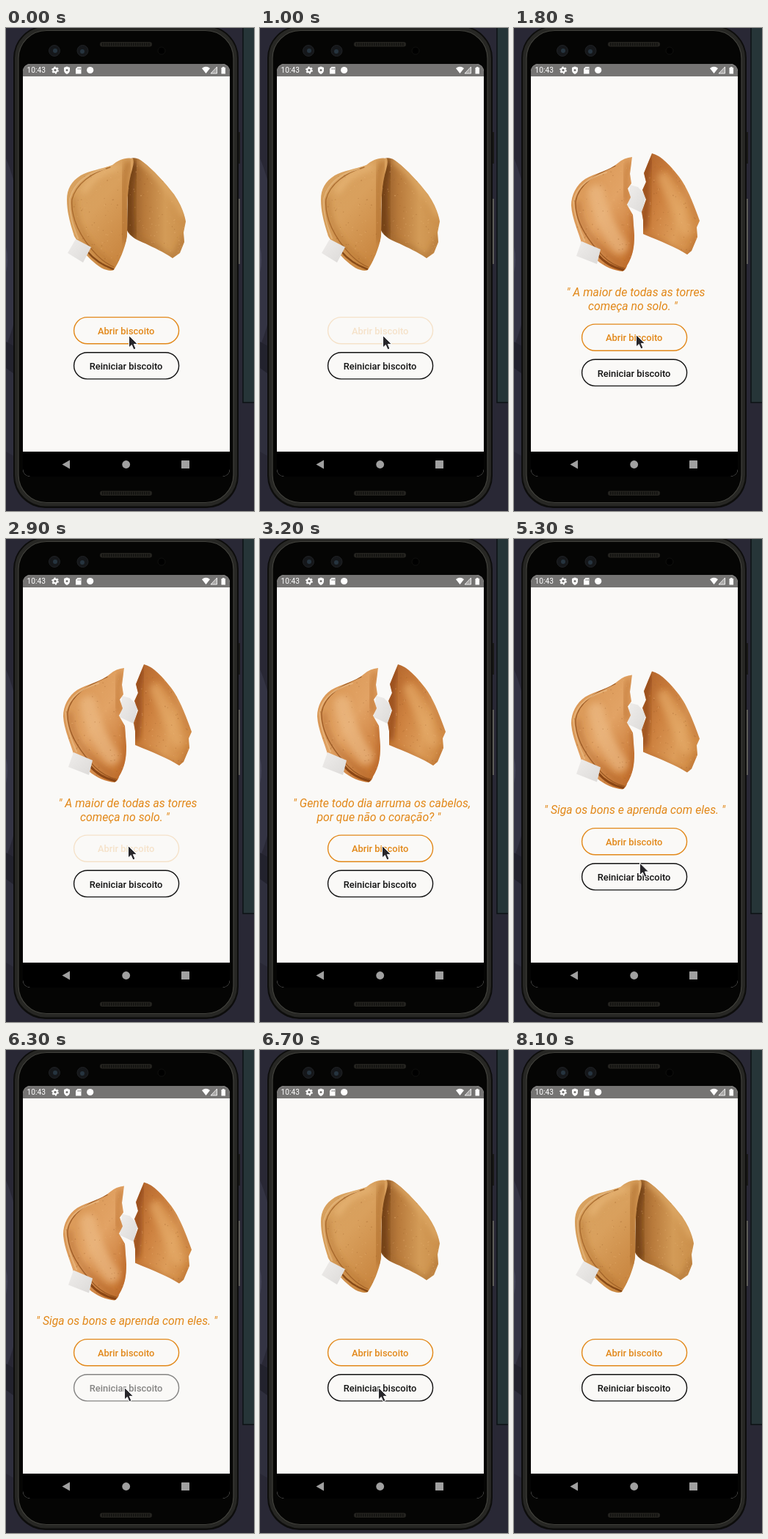
An HTML page that plays this animation: 338 by 659 pixels, repeating every 8.2 s.

```html
<!DOCTYPE html>
<html lang="pt">
<head>
<meta charset="utf-8">
<title>Biscoito da sorte</title>
<style>
  html, body { margin: 0; width: 100%; height: 100%; overflow: hidden; background: #292835; }
  svg { display: block; width: 338px; height: 659px; }
  text { font-family: Roboto, Arial, sans-serif; }
  .quote { font-size: 15.8px; font-style: italic; fill: #e28819; text-anchor: middle; }
  .button rect { fill: none; stroke-width: 1.4; }
  .button text { font-size: 12.9px; font-weight: 500; text-anchor: middle; }
  .soft { fill: none; filter: url(#blur); stroke-linecap: round; }
  .line { fill: none; stroke-linecap: round; }
</style>
</head>
<body>
<svg viewBox="0 0 338 659">
  <defs>
    <filter id="blur" x="-50%" y="-50%" width="200%" height="200%"><feGaussianBlur stdDeviation="4"/></filter>
    <linearGradient id="lobe" x1="0" y1="0" x2=".7" y2="1">
      <stop offset="0" stop-color="#d7a260"/><stop offset=".5" stop-color="#d9a05d"/><stop offset="1" stop-color="#c8853f"/>
    </linearGradient>
    <linearGradient id="inner">
      <stop offset="0" stop-color="#8d5524"/><stop offset=".3" stop-color="#b87a3b"/>
      <stop offset=".65" stop-color="#d39b57"/><stop offset="1" stop-color="#cb8f4a"/>
    </linearGradient>
    <linearGradient id="halfLeft" x1="0" y1="0" x2=".8" y2="1">
      <stop offset="0" stop-color="#d69350"/><stop offset=".55" stop-color="#e2a365"/><stop offset="1" stop-color="#c67431"/>
    </linearGradient>
    <linearGradient id="halfRight" x1="0" y1=".2" x2="1" y2=".7">
      <stop offset="0" stop-color="#b0622a"/><stop offset=".35" stop-color="#cd813f"/>
      <stop offset=".7" stop-color="#dd9d5a"/><stop offset="1" stop-color="#d08a45"/>
    </linearGradient>
    <linearGradient id="paper" x1="0" y1="0" x2="1" y2="1">
      <stop offset="0" stop-color="#efedeb"/><stop offset="1" stop-color="#dcdad8"/>
    </linearGradient>
    <path id="closedRight" d="M167 180C172 175 181 177 187 183C200 193 216 210 229 227C238 240 243 253 245 264L242 279 243 292 237 307 227 314C214 305 202 300 190 294C180 290 169 285 165 276Z"/>
    <path id="closedLeft" d="M173 178C163 176 153 180 145 187C132 192 112 195 102 201C89 209 83 220 83 234C83 252 88 268 93 284L108 308C117 318 128 328 137 330Q143 332 147 330C154 319 162 302 165 284C166 257 163 221 172 193Q175 183 173 178Z"/>
    <path id="openLeft" d="M161 176Q150 177 142 184C130 195 110 198 97 206C85 214 78 228 78 242C79 260 87 276 92 293L112 316C123 326 137 331 148 332Q153 329 154 324C162 311 164 299 164 283L162 255 154 241 159 231 155 219 160 212 158 199Z"/>
    <path id="openRight" d="M188 171C201 174 214 189 225 203C237 219 245 241 253 263L249 272 250 285 242 304 236 309C221 299 202 292 176 281L176 262 174 251 180 234 175 221 180 210 177 198Z"/>
    <clipPath id="clip-closedRight"><use href="#closedRight"/></clipPath>
    <clipPath id="clip-closedLeft"><use href="#closedLeft"/></clipPath>
    <clipPath id="clip-openLeft"><use href="#openLeft"/></clipPath>
    <clipPath id="clip-openRight"><use href="#openRight"/></clipPath>
    <clipPath id="screen"><rect x="23" y="49" width="282" height="563" rx="10"/></clipPath>
  </defs>

  <!-- Desktop -->
  <rect width="338" height="659" fill="#292835"/>
  <ellipse cx="-38" cy="306" rx="60" ry="165" fill="#343444"/>
  <ellipse cx="-38" cy="316" rx="40" ry="56" fill="#434356"/>
  <path d="M0 428L14 436V474L0 464Z" fill="#22222d"/>
  <path d="M0 464L14 474V586L0 578Z" fill="#2f2f3d"/>
  <rect x="323" y="-2" width="18" height="513" fill="#263538" stroke="#0d1214" stroke-width="1.5"/>

  <!-- Phone -->
  <path d="M317.5 142V185" stroke="#191917" stroke-width="3"/>
  <path d="M317.5 233V322" stroke="#65645f" stroke-width="2.5"/>
  <rect x="10" y="-3" width="307" height="658" rx="44" fill="#0d0d0c"/>
  <rect x="14.500" y="1" width="298" height="649" rx="40" fill="none" stroke="#272724" stroke-width="5"/>
  <rect x="17" y="3.500" width="293" height="644" rx="38" fill="#050504" stroke="#42423d" stroke-width="1.2"/>
  <g fill="#15171a" stroke="#202225">
    <circle cx="66" cy="31" r="7.5"/><circle cx="104.500" cy="31" r="7.5"/>
  </g>
  <g fill="#26343f"><circle cx="67" cy="31" r="3"/><circle cx="104" cy="32" r="3"/></g>
  <circle cx="212" cy="31" r="5" fill="#000" stroke="#11110f"/>
  <g id="grille">
    <rect x="128" y="19" width="71" height="6.500" rx="3.2" fill="#24231f"/>
    <path d="M131 22.200H197" stroke="#11110f" stroke-width="4" stroke-dasharray="1.5 1.5"/>
  </g>
  <use href="#grille" y="612.500"/>

  <!-- Screen -->
  <g clip-path="url(#screen)">
    <rect x="23" y="49" width="282" height="563" fill="#faf9f7"/>
    <rect x="23" y="49" width="282" height="17" fill="#757473"/>
    <rect x="23" y="578" width="282" height="34"/>
  </g>
  <g fill="#fff">
    <text x="28.500" y="61.300" font-size="10.2">10:43</text>
    <circle cx="67" cy="57.500" r="2.7" fill="none" stroke="#fff" stroke-width="2"/>
    <circle cx="67" cy="57.500" r="4.2" fill="none" stroke="#fff" stroke-width="1.5" stroke-dasharray="2.2 2.2"/>
    <path d="M83 52.500L87 54V57.500Q87 61 83 63Q79 61 79 57.500V54Z"/>
    <circle cx="83" cy="57.500" r="1.5" fill="#757473"/>
    <path d="M97.500 53H102.500V62.500H95V55.500Z"/>
    <path d="M98 54.500V57M99.800 54.500V57M101.300 54.500V57" stroke="#757473" stroke-width=".7"/>
    <circle cx="114.700" cy="57.500" r="4.6"/>
    <path d="M267 55Q272.500 50.500 278 55L272.500 62Z"/>
    <path d="M287.500 53V62H279Z" fill="#aaa9a8" stroke="#fff" stroke-width=".8"/>
    <path d="M293.500 54H295V53H297.500V54H299V62.500H293.500Z"/>
  </g>
  <g fill="#a0a0a0">
    <path d="M76.500 595.500L87 589.500V601.500Z"/><circle cx="163.700" cy="595.500" r="5.4"/><rect x="239" y="590" width="11" height="11" rx=".5"/>
  </g>

  <!-- Whole cookie -->
  <g id="whole">
    <use href="#closedRight" fill="url(#inner)"/>
    <g clip-path="url(#clip-closedRight)">
      <path class="soft" d="M174 188C165 216 167 250 170 285" stroke="#67380f" stroke-width="13" opacity=".75"/>
      <path class="soft" d="M184 181C205 198 228 225 242 254" stroke="#dfaa68" stroke-width="7"/>
      <path class="soft" d="M176 287Q203 297 228 315L244 285" stroke="#a56a2d" stroke-width="4"/>
      <g data-speckle="165 180 80 130"></g>
    </g>
    <use href="#closedLeft" fill="url(#lobe)"/>
    <g clip-path="url(#clip-closedLeft)">
      <path class="soft" d="M92 232C91 262 108 298 145 323" stroke="#b2712f" stroke-width="4"/>
      <path class="soft" d="M167 184C157 211 163 255 161 290" stroke="#b0702f" stroke-width="7"/>
      <path class="soft" d="M150 190Q118 198 107 221" stroke="#e7b576" stroke-width="10" opacity=".8"/>
      <path class="line" d="M142 190C117 197 95 213 90 234C88 259 101 286 124 310Q135 321 147 326" stroke="#98581f" stroke-width="1.3" opacity=".7"/>
      <path class="line" d="M135 192C112 198 93 210 87 233C86 251 91 270 98 287" stroke="#e4b67b" stroke-width="2" opacity=".8"/>
      <path class="line" d="M110 304Q124 321 146 329" stroke="#874a17" stroke-width="2.5"/>
      <g data-speckle="85 180 80 150"></g>
    </g>
    <path d="M95 288L116 299 105 320 84 307Z" fill="url(#paper)"/>
  </g>

  <!-- Broken cookie -->
  <g id="broken">
    <path d="M158 214L169 217 180 229 174 252 155 243Z" fill="url(#paper)"/>
    <use href="#openRight" fill="url(#halfRight)"/>
    <g clip-path="url(#clip-openRight)">
      <path class="soft" d="M184 178L179 205 180 237 177 272" stroke="#8c4315" stroke-width="7"/>
      <path class="soft" d="M193 174C216 192 238 228 250 259" stroke="#b86a2e" stroke-width="3"/>
      <path class="soft" d="M204 205Q221 240 234 276" stroke="#e6ad6c" stroke-width="16" opacity=".6"/>
      <path class="soft" d="M176 284Q208 294 236 313L252 285" stroke="#b3692a" stroke-width="4"/>
      <g data-speckle="175 172 78 138"></g>
    </g>
    <use href="#openLeft" fill="url(#halfLeft)"/>
    <g clip-path="url(#clip-openLeft)">
      <path class="soft" d="M87 238C87 264 106 298 149 325" stroke="#b0652a" stroke-width="4"/>
      <path class="soft" d="M163 255Q168 294 154 328" stroke="#b9682a" stroke-width="6"/>
      <path class="soft" d="M157 184Q150 205 153 235" stroke="#bd7233" stroke-width="5"/>
      <path class="soft" d="M112 225Q118 262 144 297" stroke="#edbc86" stroke-width="22" opacity=".65"/>
      <path class="line" d="M138 188C113 199 88 212 84 237C83 261 98 287 121 311Q134 324 151 328" stroke="#8e4d1a" stroke-width="1.4" opacity=".75"/>
      <path class="line" d="M126 197C106 203 86 213 81 237C82 253 88 272 96 290" stroke="#e9b880" stroke-width="2" opacity=".8"/>
      <path class="line" d="M114 309Q127 325 149 330" stroke="#8a4615" stroke-width="3"/>
      <g data-speckle="80 178 82 153"></g>
    </g>
    <path d="M92 291L118 302 113 322 85 311Z" fill="url(#paper)"/>
  </g>

  <text id="line1" class="quote"></text>
  <text id="line2" class="quote" x="161.800" y="384.700"></text>

  <g id="buttons" class="button">
    <g id="open">
      <rect x="92.600" y="394.600" width="143" height="36.200" rx="18.100" stroke="#e28819"/>
      <text x="163.700" y="417.600" fill="#e28819">Abrir biscoito</text>
    </g>
    <g id="reset">
      <rect x="92.600" y="442.700" width="143" height="36.200" rx="18.100" stroke="#121212"/>
      <text x="163.600" y="466" fill="#121212">Reiniciar biscoito</text>
    </g>
  </g>
  <path id="cursor" d="M0 0V16.500L3.800 13 6.500 19.300 9.500 18 6.800 11.900H12Z" fill="#27262a" stroke="#fff" stroke-width="1" stroke-linejoin="round"/>
</svg>
<script>
const LOOP = 8200, STEP = 100;
const el = id => document.getElementById(id);

// Tracks are lists of [start, ...values]; each entry holds until the next.
const quotes = [
  [0], [1100, '" A maior de todas as torres', 'começa no solo. "'],
  [3000, '" Gente todo dia arruma os cabelos,', 'por que não o coração? "'],
  [4800, '" Siga os bons e aprenda com eles. "'], [6500],
];
const openFade = [
  [0, 1], [900, .6], [1000, .2], [1100, .25], [1200, .55], [1300, .9], [1400, 1],
  [2900, .2], [3000, .3], [3100, .8], [3200, 1],
  [4600, .2], [4800, .3], [4900, .8], [5000, 1],
];
const resetFade = [[0, 1], [6300, .5], [6400, .2], [6500, .4], [6600, .85], [6700, 1]];
const pointer = [
  [0, 167.5, 419.5], [1800, 166.5, 418.5], [5300, 171.5, 442], [5400, 170, 450],
  [5500, 166, 456], [5600, 163, 459], [5700, 161.5, 460.5], [6800, 190, 452],
  [6900, 218, 442], [7200, 165, 380], [7300, 109, 312], [7400, -50, -50],
];
const at = (track, t) => track.findLast(entry => entry[0] <= t).slice(1);

let seed = 7;
const random = () => (seed = seed * 16807 % 2147483647) / 2147483647;
for (const group of document.querySelectorAll('[data-speckle]')) {
  const [x, y, w, h] = group.dataset.speckle.split(' ').map(Number);
  let dots = '';
  for (let i = 0; i < 130; i++) {
    const tone = random() < .55 ? '#8f5522' : '#f0bd80';
    dots += `<circle cx="${x + w * random()}" cy="${y + h * random()}" r="${.4 + .5 * random()}" fill="${tone}" opacity=".3"/>`;
  }
  group.innerHTML = dots;
}

function draw(now) {
  const t = Math.floor(now % LOOP / STEP) * STEP;
  const [first = '', second = ''] = at(quotes, t);
  const twoLines = second !== '';

  el('whole').style.display = first ? 'none' : '';
  el('broken').style.display = first ? '' : 'none';
  el('broken').setAttribute('transform', `translate(0 ${twoLines ? 0 : 9.5})`);
  el('buttons').setAttribute('transform', `translate(0 ${twoLines ? 9.5 : 0})`);

  el('line1').textContent = first;
  el('line1').setAttribute('x', twoLines ? 166 : 164.5);
  el('line1').setAttribute('y', twoLines ? 365.7 : 375.2);
  el('line2').textContent = second;

  el('open').style.opacity = at(openFade, t)[0];
  el('reset').style.opacity = at(resetFade, t)[0];
  el('cursor').setAttribute('transform', `translate(${at(pointer, t)})`);
  requestAnimationFrame(() => draw(performance.now() - start));
}
const start = performance.now();
draw(0);
</script>
</body>
</html>
```
